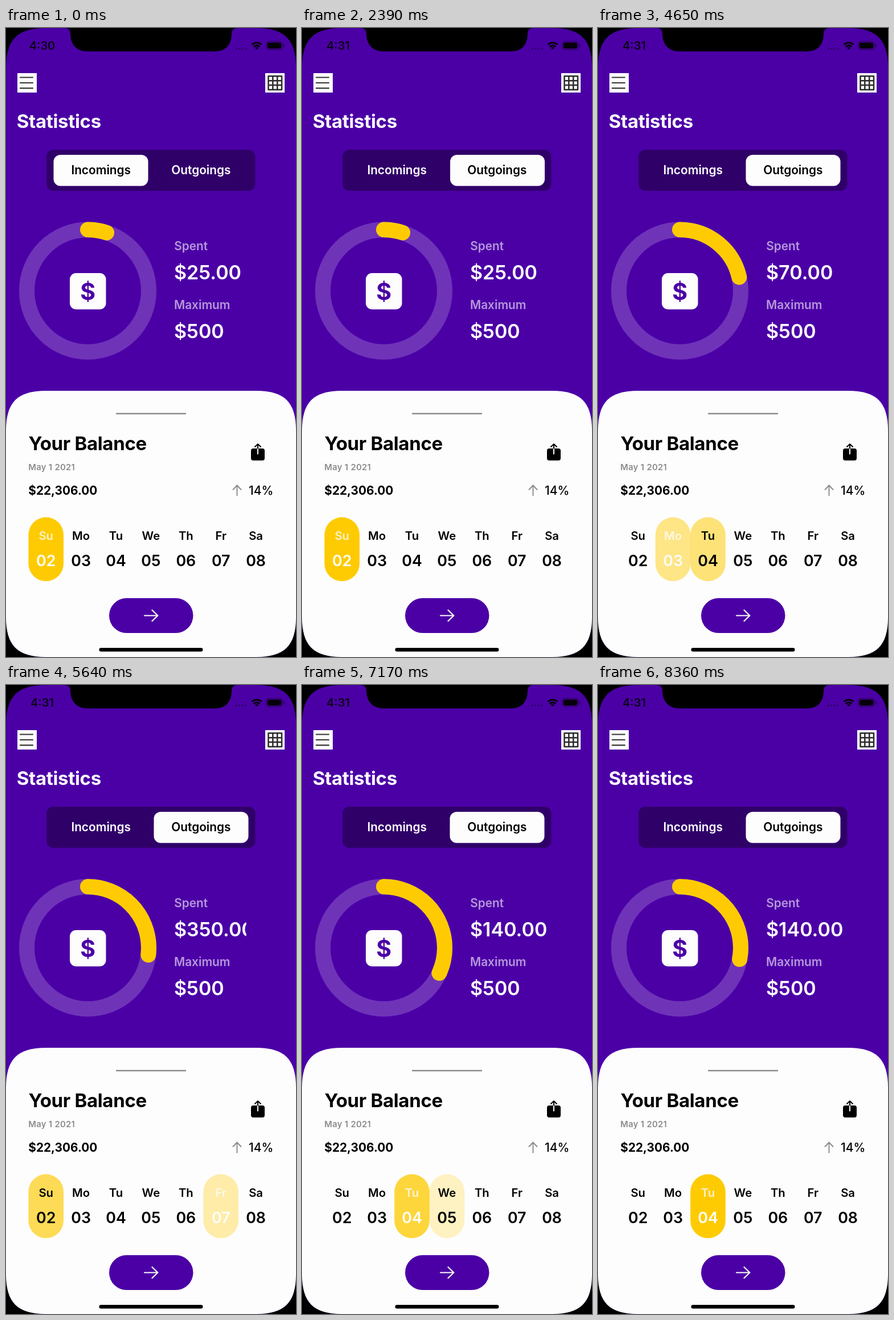
An HTML page that plays this animation: 509 by 1101 pixels, repeating every 8.39 s.

```html
<!DOCTYPE html>
<html lang="en">
<head>
<meta charset="utf-8">
<title>Statistics</title>
<style>
html, body { margin: 0; width: 100%; height: 100%; overflow: hidden; background: #000; }
svg { display: block; width: 509px; height: 1101px; }
text { font: 600 20.8px Inter, "Liberation Sans", sans-serif; font-optical-sizing: none; }
.title { font-size: 33px; font-weight: 700; letter-spacing: -.01em; }
.money { font-size: 34px; }
.mid { text-anchor: middle; }
.line { fill: none; stroke-linecap: round; stroke-linejoin: round; }
</style>
</head>
<body>
<svg viewBox="0 0 509 1101">
  <defs>
    <clipPath id="screen"><path d="M0 70C0 20 20 0 70 0H439C489 0 509 20 509 70V1031C509 1081 489 1101 439 1101H70C20 1101 0 1081 0 1031Z"/></clipPath>
    <clipPath id="reveal"><rect id="revealBox" x="290" y="400" width="160" height="56"/></clipPath>
  </defs>
  <g clip-path="url(#screen)">
    <rect width="509" height="1101" fill="#4b00a6"/>

    <!-- status bar -->
    <path d="M103 0Q113 0 113 10C113 30 125 41 143 41H367C385 41 396 30 396 10Q396 0 406 0Z"/>
    <text id="clock" class="mid" x="63.5" y="38" style="font-size:20px" fill="#0c0018">4:30</text>
    <g fill="#000" opacity=".25">
      <circle cx="404" cy="36" r="2"/><circle cx="409.7" cy="36" r="2"/><circle cx="415.3" cy="36" r="2"/><circle cx="421" cy="36" r="2"/>
    </g>
    <g fill="none" stroke="#050009" stroke-width="3">
      <path d="M431.5 29.2A12.2 12.2 0 0 1 448.5 29.2"/>
      <path d="M434.8 32.8A7.6 7.6 0 0 1 445.2 32.8"/>
    </g>
    <path d="M440 38L436.8 34.8A4.6 4.6 0 0 1 443.2 34.8Z" fill="#050009"/>
    <rect x="456.5" y="23.5" width="29" height="14.5" rx="4.5" fill="none" stroke="#000" stroke-opacity=".4" stroke-width="1.3"/>
    <rect x="458.6" y="25.6" width="24.8" height="10.3" rx="2.8" fill="#050009"/>
    <path d="M487 28.3Q489.3 29 489.3 30.8T487 33.3Z" fill-opacity=".45"/>

    <!-- header -->
    <rect x="20" y="79" width="34" height="34" fill="#fdfdfd"/>
    <path class="line" d="M25 86.5H47M25 96H47M25 105.3H47" stroke="#333" stroke-width="2.2"/>
    <rect x="455" y="79" width="34" height="34" fill="#fdfdfd"/>
    <path class="line" d="M460.5 84.3H484V108H460.5ZM468.3 84.3V108M476.2 84.3V108M460.5 92.2H484M460.5 100.1H484" stroke="#2b2b2b" stroke-width="2.5"/>
    <text class="title" x="18.7" y="175" fill="#fdfdfd">Statistics</text>

    <!-- tabs -->
    <rect x="71" y="213" width="366.5" height="72" rx="12" fill="#300069"/>
    <rect id="thumbIn" y="222" width="166" height="54.5" rx="12" fill="#fdfdfd"/>
    <text id="textIn" class="mid" x="166.7" y="256.3">Incomings</text>
    <rect id="thumbOut" y="222" width="166" height="54.5" rx="12" fill="#fdfdfd"/>
    <text id="textOut" class="mid" x="342.4" y="256.3">Outgoings</text>

    <!-- ring -->
    <g fill="none" stroke-width="27" transform="rotate(-90 143.5 460)">
      <circle cx="143.5" cy="460" r="107" stroke="#6f33b8"/>
      <circle id="ring" cx="143.5" cy="460" r="107" pathLength="1" stroke="#fecb02" stroke-linecap="round"/>
    </g>
    <rect x="112" y="429" width="63.5" height="63.5" rx="11" fill="#fdfdfd"/>
    <text class="mid" x="143.7" y="475.5" style="font-size:41px;font-weight:700" fill="#4b00a6">$</text>
    <g fill="#fdfdfd">
      <text x="295.3" y="389" fill-opacity=".6">Spent</text>
      <g clip-path="url(#reveal)"><text id="spent" class="money" x="295" y="440">$25.00</text></g>
      <text x="295" y="492.3" fill-opacity=".6">Maximum</text>
      <text class="money" x="295" y="543">$500</text>
    </g>

    <!-- balance sheet -->
    <path d="M0 705C0 655 20 635 70 635H439C489 635 509 655 509 705V1101H0Z" fill="#fdfdfd"/>
    <path d="M193 675H316" stroke="#8b8b8f" stroke-width="2.6"/>
    <text class="title" x="39.5" y="739">Your Balance</text>
    <text x="39.3" y="773.7" style="font-size:14.8px;letter-spacing:.02em" fill="#8b8b8f">May 1 2021</text>
    <text x="39.3" y="817" style="font-weight:700">$22,306.00</text>
    <text x="426" y="817" style="font-size:21px;font-weight:500">14%</text>
    <path class="line" d="M405.5 818.5V801M398.5 808L405.5 800.5L412.5 808" stroke="#8b8b8f" stroke-width="1.9"/>
    <rect x="430" y="736" width="24" height="21" rx="4"/>
    <path class="line" d="M442 738V728.5M437 733L442 728.3L447 733" stroke="#000" stroke-width="2"/>
    <path class="line" d="M442 737V745.5" stroke="#fdfdfd" stroke-width="2"/>
    <g id="week"></g>
    <rect x="181" y="998" width="147.5" height="61" rx="30.5" fill="#4b00a6"/>
    <path class="line" d="M243 1028.5H266M256.5 1019L266.3 1028.5L256.5 1038" stroke="#fdfdfd" stroke-width="2.2"/>
    <rect x="163.5" y="1085" width="182" height="6.5" rx="3.2"/>
  </g>
</svg>
<script>
const LOOP = 8390, FADE = 350, BUDGET = 500, WHITE = '#fdfdfd';
const $ = id => document.getElementById(id);

const days = ['Su', 'Mo', 'Tu', 'We', 'Th', 'Fr', 'Sa'];
const amounts = [25, 70, 140, 220, 290, 350, 400];

// [time of tap in ms, chosen index]
const dayTaps = [[3650, 1], [4060, 2], [4482, 1], [4990, 0], [5500, 5],
                 [6450, 3], [6939, 2], [7430, 1], [8000, 2]];
const tabTaps = [[2155, 1], [2670, 0], [3185, 1]];

function add(tag, attrs, label = '') {
  const el = document.createElementNS('http://www.w3.org/2000/svg', tag);
  for (const key in attrs) el.setAttribute(key, attrs[key]);
  el.textContent = label;
  $('week').append(el);
  return el;
}

const cells = days.map((day, i) => {
  const x = 70.2 + 61.4 * i;
  return {
    pill: add('rect', { x: x - 30.8, y: 856.3, width: 61.6, height: 112, rx: 30.8, fill: '#fecb02' }),
    name: add('text', { x, y: 896, class: 'mid', style: 'font-size:20.3px' }, day),
    date: add('text', { x, y: 942, class: 'mid', style: 'font-size:26.8px' }, '0' + (i + 2)),
  };
});

const mix = (a, b, p) => a + (b - a) * p;

// cubic-bezier(.42, 0, .58, 1)
function easeInOut(x) {
  if (x <= 0) return 0;
  if (x >= 1) return 1;
  let lo = 0, hi = 1;
  for (let i = 0; i < 20; i++) {
    const s = (lo + hi) / 2, r = 1 - s;
    if (1.26 * s * r * r + 1.74 * s * s * r + s * s * s < x) lo = s; else hi = s;
  }
  return lo * lo * (3 - 2 * lo);
}

// under-damped spring from 0 to 1
function spring(ms, response = .4, damping = .75) {
  const t = ms / 1000, w = 2 * Math.PI / response;
  const root = Math.sqrt(1 - damping * damping), a = w * root * t;
  return 1 - Math.exp(-damping * w * t) * (Math.cos(a) + damping / root * Math.sin(a));
}

// current and previous choice, and the time since the tap
function choice(taps, t) {
  let state = { from: 0, to: 0, age: 1e4 };
  for (const [start, to] of taps)
    if (t >= start) state = { from: state.to, to, age: t - start };
  return state;
}

function drawTabs(t) {
  const { from, to, age } = choice(tabTaps, t);
  const pos = mix(from, to, spring(age));
  const shade = Math.min(1, Math.max(0, pos));
  for (const [id, alpha] of [['thumbIn', 1 - shade], ['thumbOut', shade]]) {
    $(id).setAttribute('x', 83.5 + 176 * pos);
    $(id).setAttribute('opacity', alpha);
  }
  $('textIn').setAttribute('fill', to ? WHITE : '#000');
  $('textOut').setAttribute('fill', to ? '#000' : WHITE);
}

const label = i => '$' + amounts[i].toFixed(2);
function textWidth(s) {
  $('spent').textContent = s;
  return $('spent').getComputedTextLength();
}

function drawDays(t) {
  const { from, to, age } = choice(dayTaps, t);
  const p = easeInOut(age / FADE);
  cells.forEach(({ pill, name, date }, i) => {
    pill.setAttribute('opacity', i === to ? p : i === from ? 1 - p : 0);
    name.setAttribute('fill', i === to ? WHITE : '#000');
    name.setAttribute('fill-opacity', i === to ? .8 : 1);
    date.setAttribute('fill', i === to ? WHITE : '#000');
  });
  const part = mix(amounts[from], amounts[to], p) / BUDGET;
  $('ring').setAttribute('stroke-dasharray', part + ' 2');
  const width = mix(textWidth(label(from)), textWidth(label(to)), p);
  $('revealBox').setAttribute('width', width + 6);
}

const begin = performance.now();
function draw() {
  const t = (performance.now() - begin) % LOOP;
  $('clock').textContent = t < 1340 ? '4:30' : '4:31';
  drawTabs(t);
  drawDays(t);
  requestAnimationFrame(draw);
}
draw();
</script>
</body>
</html>
```
